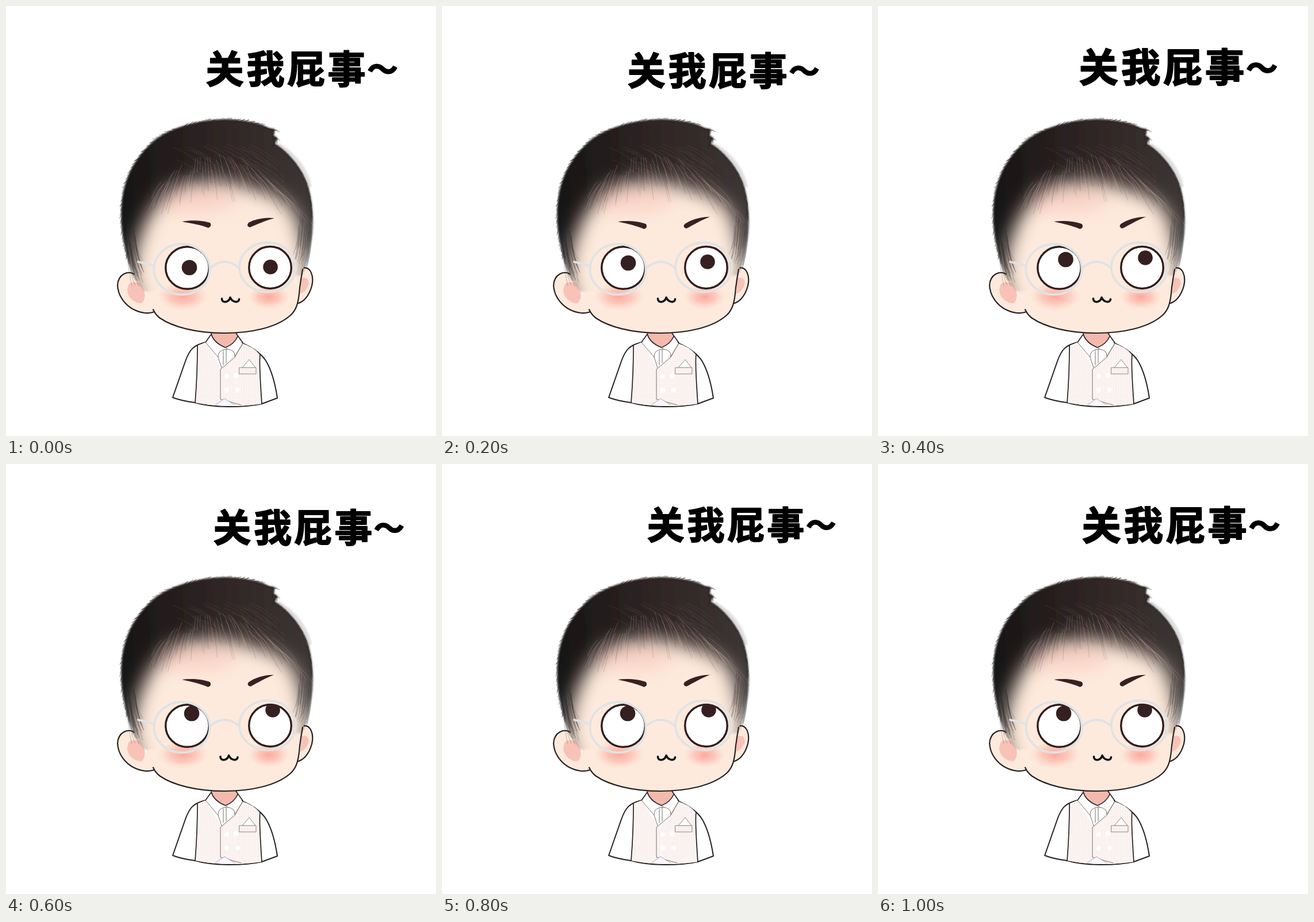
Animation, 748 px wide and 748 px high, one loop 1.2 s. Source, as an HTML page:

```html
<!DOCTYPE html>
<html lang="zh-CN">
<head>
<meta charset="utf-8">
<style>
html, body { margin: 0; width: 100%; height: 100%; overflow: hidden; background: #fff; }
svg { display: block; width: 100%; height: 100%; }
text { font: 900 66px "Noto Sans CJK SC", "Noto Sans CJK", sans-serif; text-anchor: middle; }
#hairs path { fill: none; stroke-linecap: round; }
</style>
</head>
<body>
<svg viewBox="0 0 748 748" fill="none" stroke-linecap="round" stroke-linejoin="round">
  <defs>
    <filter id="soft" x="-50%" y="-50%" width="200%" height="200%"><feGaussianBlur stdDeviation="16"/></filter>
    <filter id="fuzz" x="-10%" y="-10%" width="120%" height="120%"><feGaussianBlur stdDeviation="1.5"/></filter>
    <linearGradient id="dark" gradientUnits="userSpaceOnUse" x1="198" x2="535" y1="320" y2="300">
      <stop offset="0" stop-color="#161414"/><stop offset=".45" stop-color="#2c2322"/>
      <stop offset=".75" stop-color="#352c2a"/><stop offset="1" stop-color="#3c3635"/>
    </linearGradient>
    <radialGradient id="blush">
      <stop offset="0" stop-color="#fd988b" stop-opacity=".8"/><stop offset=".5" stop-color="#fdab9f" stop-opacity=".55"/>
      <stop offset="1" stop-color="#fdc5b8" stop-opacity="0"/>
    </radialGradient>
    <pattern id="dots" width="4" height="4" patternUnits="userSpaceOnUse">
      <rect width="4" height="4" fill="#fbf4f2"/><circle cx="2" cy="2" r=".8" fill="#f3e4e1"/>
    </pattern>
    <mask id="fringe" maskUnits="userSpaceOnUse" x="150" y="150" width="440" height="400">
      <rect x="150" y="150" width="440" height="400" fill="#fff"/>
      <path fill="#000" filter="url(#soft)" d="M246 560 L217 470 C223 415 242 360 280 324 C315 300 380 300 420 314 C458 326 490 332 506 370 L524 440 V560Z"/>
    </mask>
    <clipPath id="eyeL"><ellipse cx="315.500" cy="455.500" rx="38.500" ry="37.500"/></clipPath>
    <clipPath id="eyeR"><ellipse cx="459.500" cy="455" rx="37.500" ry="37.500"/></clipPath>
  </defs>

  <!-- body -->
  <path fill="#fff" stroke="#262223" stroke-width="2" d="M347 585 C326 590 319 598 312 618 L290 681 Q306 687 329 690 C360 699 412 699 445 692 L472 682 C468 655 461 632 452 617 Q440 599 410 586 L384 597Z"/>
  <path fill="url(#dots)" d="M333 591 L347 585 L376 629 L411 587 Q431 593 441 606 L445 692 Q387 701 329 690 Q333 640 333 591Z"/>
  <path fill="#fff" d="M347 585 L372 627 L380 627 L411 587 L403 575 L384 597 L357 571Z"/>
  <path fill="#f4b9ad" d="M357 566 H402 L403 576 Q396 588 382 593 Q364 586 357 574Z"/>
  <path stroke="#262223" stroke-width="1.7" d="M333 591 Q333 640 329 690 M442 606 Q440 620 445 692 M357 571 L347 585 M400 569 L412 586 M357 570 Q361 586 382 594 Q397 588 403 575"/>
  <path stroke="#77706f" d="M347 585 L369 611 Q368 598 384 597 Q399 598 398 610 L412 587 M369 611 L375 629 M378 600 V624 M383 598 V621 M411 588 L398 611 L373 632 V684 L409 694"/>
  <path fill="#f7f7ff" stroke="#999" stroke-width=".8" d="M364 694 L380 683 L398 694"/>
  <g fill="#fff"><circle cx="384" cy="644" r="4.5"/><circle cx="400" cy="643" r="4.5"/><circle cx="384" cy="668" r="4.5"/><circle cx="403" cy="668" r="4.5"/></g>
  <path fill="#fff" stroke="#8d8584" d="M411 629 L423 615 L434 629Z"/>
  <rect x="406" y="629" width="29" height="11" fill="#faf0ee" stroke="#8d8584"/>

  <!-- ears and face -->
  <g fill="#fdeadc" stroke="#262223" stroke-width="2.2">
    <path d="M224 467 C213 459 195 466 194 486 C195 506 211 530 242 534 Q252 535 260 531"/>
    <path d="M516 456 C530 452 536 470 532 487 C527 505 517 516 505 518"/>
  </g>
  <path fill="#f9c2b8" d="M213 485 C220 476 238 481 240 491 C243 505 241 513 236 517 C225 518 210 507 211 493Z"/>
  <path fill="#f9c2b8" d="M514 474 C522 470 529 476 526 486 C523 494 517 499 512 500Z"/>
  <path fill="#fdeadc" d="M222 465 C202 400 202 330 250 275 C300 220 440 220 490 275 C532 330 525 400 517 460 L511 490 C509 515 506 528 495 538 C470 560 425 569 380 569 C330 569 290 558 268 543 C254 532 248 518 244 500Z"/>
  <path stroke="#262223" stroke-width="2.2" d="M516 458 Q513 475 511 490 C509 515 506 528 495 538 C470 560 425 569 380 569 C330 569 290 558 268 543 Q260 537 256 528"/>
  <ellipse cx="325" cy="335" rx="80" ry="22" fill="#f6bdb2" opacity=".55" filter="url(#soft)"/>

  <!-- hair -->
  <path stroke="#bbb" stroke-width="7" opacity=".45" filter="url(#fuzz)" d="M476 243 C503 260 521 284 528 312"/>
  <g mask="url(#fringe)"><path id="hair" fill="url(#dark)" filter="url(#fuzz)" d="M243 497 C226 480 214 455 207 420 C199 385 198 346 206 316 C214 282 235 252 263 230 C294 209 336 198 382 197 C415 198 440 203 457 212 L468 214 L466 225 L473 230 L468 239 C496 258 517 285 526 315 C535 345 536 385 530 415 Q526 445 515 468Z"/></g>
  <g id="hairs"></g>

  <!-- face details -->
  <ellipse cx="308" cy="505" rx="44" ry="25" fill="url(#blush)"/>
  <ellipse cx="457" cy="506" rx="36" ry="22" fill="url(#blush)"/>
  <g fill="#3a2022">
    <path id="browL" d="M306 375 C322 372 342 373 355 377 Q359 383 352 386 C340 381 322 378 306 375Z"/>
    <path id="browR" d="M467 369 C450 367 432 371 422 377 Q417 382 424 385 C437 380 451 373 467 369Z"/>
  </g>
  <g fill="#fff" stroke="#2f1d1e" stroke-width="3.4">
    <ellipse cx="315.500" cy="455.500" rx="37.800" ry="36.800"/><ellipse cx="459.500" cy="455" rx="36.800" ry="36.500"/>
  </g>
  <g fill="#351f21">
    <g clip-path="url(#eyeL)"><circle id="pupilL" r="13.3"/></g>
    <g clip-path="url(#eyeR)"><circle id="pupilR" r="12.8"/></g>
  </g>
  <g stroke="#dfe3e5" stroke-width="3.8">
    <ellipse cx="306" cy="458" rx="48.500" ry="44"/><ellipse cx="455" cy="454.500" rx="49" ry="43"/>
    <path d="M355 456 Q380 434 406 456 M230 445 L257 452"/>
  </g>
  <path id="mouth" stroke="#111" stroke-width="3.6" d="M375.500 509 C375 517 387 517 390 507 C394 516 405 517 405.500 510"/>

  <g id="words" fill="#000" stroke="#000" stroke-width="2">
    <text x="32.500 103.500 174 244.500" y="58">关我屁事</text>
    <text x="307" y="54" style="font-size:53px" stroke-width="2">～</text>
  </g>
</svg>
<script>
const $ = id => document.getElementById(id);
let seed = 7;
const rnd = () => (seed = seed * 16807 % 2147483647) / 2147483647;
const between = (a, b) => a + (b - a) * rnd();

function strands(count, color, width, shape) {
  let d = '';
  for (let i = 0; i < count; i++) {
    const [x, y, cx, cy, ex, ey] = shape(i / count).map(v => v.toFixed(1));
    d += `M${x} ${y}Q${cx} ${cy} ${ex} ${ey}`;
  }
  $('hairs').insertAdjacentHTML('beforeend', `<path d="${d}" stroke="${color}" stroke-width="${width}"/>`);
}

// Fringe hairs fan out from the crown
const fan = (lift, reach) => t => {
  const x = 270 + 200 * t, y = 308 - 38 * Math.sin(Math.PI * t) + between(-lift, lift);
  const len = between(.3, 1) * reach, dx = len * (1.7 * t - .6);
  return [x, y, x + dx * .6, y + len * .35, x + dx, y + len];
};
strands(90, '#4a383533', 1, fan(16, 62));
strands(50, '#f0d0c63a', 1, fan(14, 66));
strands(40, '#8a757026', 1.2, t => {
  const x = between(290, 440), y = between(240, 285);
  return [x, y, x + 25, y + 8, x + 50, y + 32];
});

// Sideburns
strands(32, '#2a242444', 1, t => {
  const x = 209 + 17 * t, y = between(390, 430);
  return [x, y, x + 4, y + 38, x + between(9, 16), y + between(48, 66)];
});
strands(30, '#3a353444', 1, t => {
  const x = 532 - 24 * t, y = between(355, 400);
  return [x, y, x - 1, y + 35, x - between(4, 10), y + between(45, 68)];
});

// Loose tips along the outline
const edge = $('hair');
strands(150, '#1c181788', 1, t => {
  const s = 70 + 620 * t, p = edge.getPointAtLength(s), q = edge.getPointAtLength(s + 2);
  const tx = (q.x - p.x) / 2, ty = (q.y - p.y) / 2;
  const run = (s < 340 ? -1 : 1) * between(6, 13), out = s < 480 ? between(0, 3) : -1;
  const x = p.x - ty * 4, y = p.y + tx * 4;
  return [x, y, p.x + tx * run / 2, p.y + ty * run / 2, p.x + tx * run + ty * out, p.y + ty * run - tx * out];
});

// Each pose: words x, y, scale; left pupil; right pupil; mouth shift
const poses = [
  [348, 76, 1, 319, 455, 460, 454, 0],
  [323, 79, 1, 324, 447, 462, 445, 0],
  [350, 72, 1.035, 326.5, 441, 465, 438, -1],
  [361, 77, .995, 323, 434, 464, 428, -2.5],
  [357, 73, .985, 323, 434, 464, 428, 0],
  [355, 72, 1.033, 323, 434, 464, 428, 0]
];
const put = (id, value) => $(id).setAttribute('transform', value);

function draw() {
  const step = Math.floor(performance.now() % 1200 / 200);
  const [x, y, scale, lx, ly, rx, ry, mouth] = poses[step];
  put('words', `translate(${x} ${y}) scale(${scale})`);
  put('pupilL', `translate(${lx} ${ly})`);
  put('pupilR', `translate(${rx} ${ry})`);
  put('mouth', `translate(${mouth})`);
  put('browL', `rotate(${step ? 2.5 : 0} 306 375)`);
  put('browR', `rotate(${step ? -6 : 0} 444 376)`);
  requestAnimationFrame(draw);
}
draw();
</script>
</body>
</html>
```
